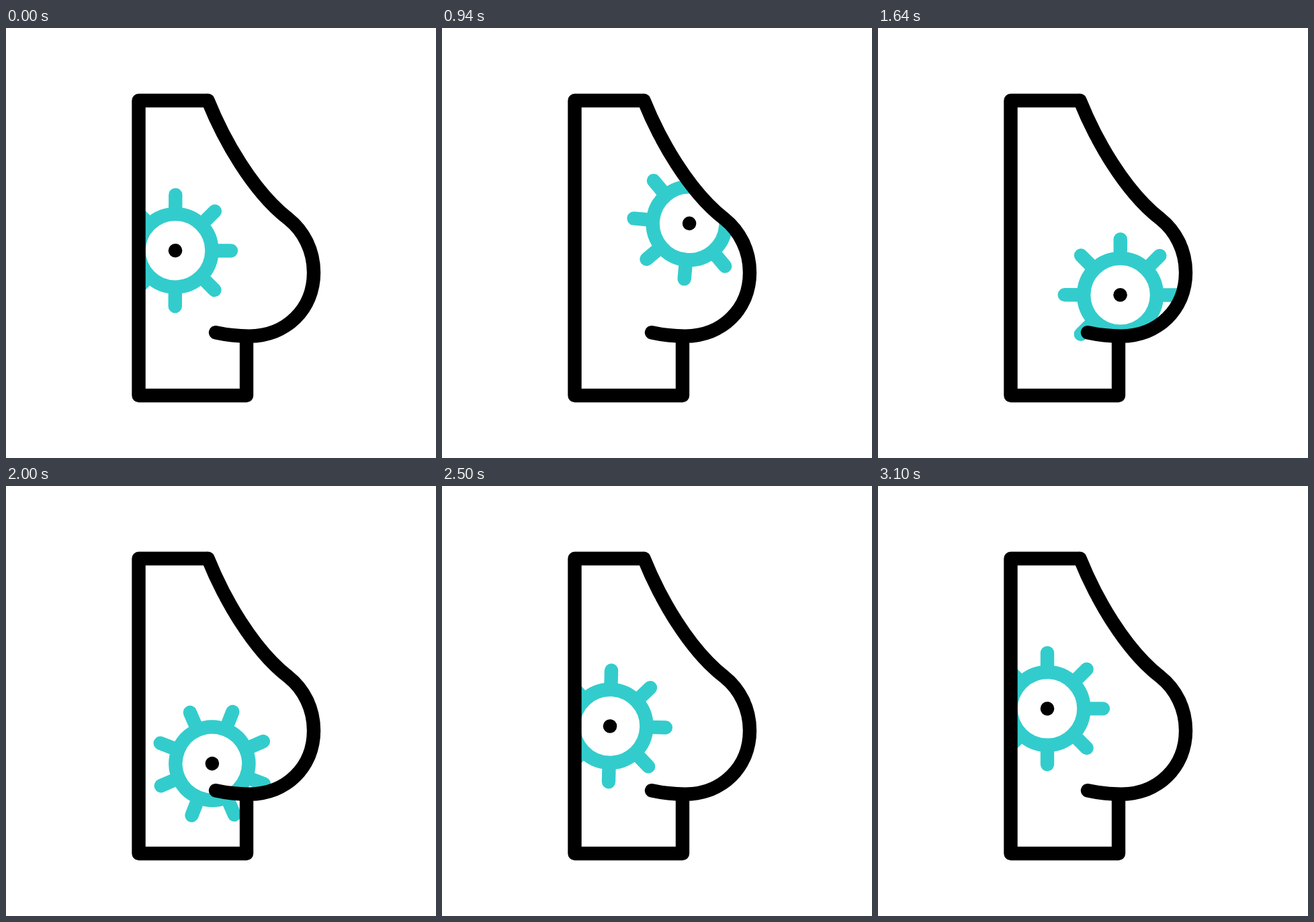
An HTML page that plays this animation: 640 by 640 pixels, repeating every 3.6 s.

```html
<!DOCTYPE html>
<html lang="en">
<head>
<meta charset="utf-8">
<title>Cell travelling inside a body outline</title>
<style>
  html, body { margin: 0; width: 100%; height: 100%; overflow: hidden; background: #fff; }
  svg { display: block; width: 100%; height: 100%; }
</style>
</head>
<body>
<svg viewBox="0 0 640 640" fill="none" stroke-linecap="round" stroke-linejoin="round" stroke-width="20.4">
  <defs>
    <clipPath id="inside">
      <path d="M197.5 108H300.6C323.6 165 366.5 242.6 420.2 284C443.5 302.5 458 331.5 458 364C458 418 417.5 458.6 362 458.6H358V547H197.5Z"/>
    </clipPath>
  </defs>
  <g clip-path="url(#inside)">
    <g id="cell">
      <g id="spokes" stroke="#33cccc"><circle r="54.4"/></g>
      <circle r="10.3" fill="#000"/>
    </g>
  </g>
  <g stroke="#000">
    <path stroke-linecap="butt" d="M358 466V547H197.5V108H300.6"/>
    <path d="M300.6 108C323.6 165 366.5 242.6 420.2 284C443.5 302.5 458 331.5 458 364C458 418 417.5 458.6 362 458.6C344 458.6 328 456.7 312 453.2"/>
  </g>
</svg>
<script>
const LOOP = 3600;
const SPEED = 0.17; // px per ms along the path
const RAD = Math.PI / 180;

// Path knots: time, position, heading in degrees clockwise from up.
const knots = [
  { t: 0,    x: 252, y: 331.4, heading: 0 },
  { t: 520,  x: 307, y: 266.4, heading: 79 },
  { t: 940,  x: 368, y: 290.7, heading: 140 },
  { t: 1640, x: 360.7, y: 397.2, heading: 225 },
  { t: 2000, x: 307, y: 413.2, heading: 291.5 },
  { t: 2500, x: 250, y: 357.6, heading: 361.4 },
  { t: 3100, x: 252, y: 331.4, heading: 360 }
];

const cell = document.getElementById('cell');
const spokes = document.getElementById('spokes');
for (let i = 0; i < 8; i++) {
  const spoke = document.createElementNS('http://www.w3.org/2000/svg', 'path');
  spoke.setAttribute('d', 'M0-58V-82.9');
  spoke.setAttribute('transform', `rotate(${i * 45})`);
  spokes.append(spoke);
}

const lerp = (a, b, u) => a + (b - a) * u;

// Cubic Hermite value and slope for one coordinate.
function hermite(p, m, q, n, u) {
  const c = 3 * (q - p) - 2 * m - n;
  const d = 2 * (p - q) + m + n;
  return { value: p + u * (m + u * (c + u * d)), slope: m + u * (2 * c + 3 * u * d) };
}

function pose(time) {
  const t = Math.min(time, 3100);
  const last = knots.length - 2;
  let i = 0;
  while (i < last && t >= knots[i + 1].t) i++;
  const a = knots[i], b = knots[i + 1];
  const span = b.t - a.t;
  const u = (t - a.t) / span;

  if (i === last) { // glide to rest
    const eased = 1 - Math.pow(1 - u, 3.9);
    return { x: lerp(a.x, b.x, eased), y: lerp(a.y, b.y, eased), angle: lerp(a.heading, b.heading, eased) };
  }
  const reach = SPEED * span;
  const sx = k => reach * Math.sin(k.heading * RAD);
  const sy = k => -reach * Math.cos(k.heading * RAD);
  const x = hermite(a.x, sx(a), b.x, sx(b), u);
  const y = hermite(a.y, sy(a), b.y, sy(b), u);
  return { x: x.value, y: y.value, angle: Math.atan2(x.slope, -y.slope) / RAD };
}

function draw(time) {
  const { x, y, angle } = pose(time);
  cell.setAttribute('transform', `translate(${x} ${y}) rotate(${angle})`);
}

const start = performance.now();
function tick() {
  draw((performance.now() - start) % LOOP);
  requestAnimationFrame(tick);
}
draw(0);
requestAnimationFrame(tick);
</script>
</body>
</html>
```
